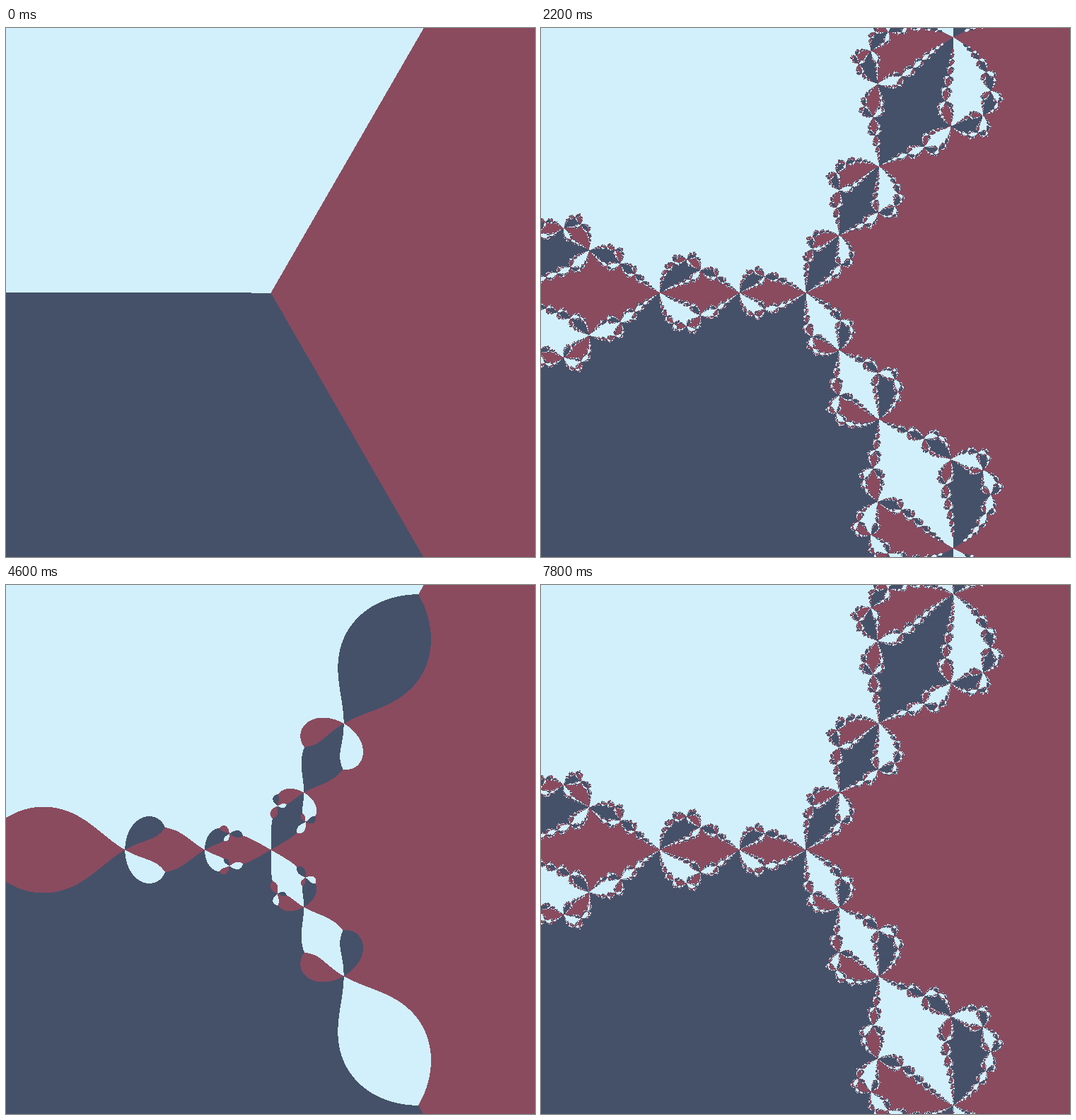
An HTML page with a canvas for the animation above (8 s loop, 748 by 748 pixels).

```html
<!DOCTYPE html>
<html lang="en">
<head>
<meta charset="utf-8">
<title>Cube root basins</title>
<style>
  html, body { margin: 0; width: 100%; height: 100%; overflow: hidden; }
  canvas { display: block; width: 748px; height: 748px; }
</style>
</head>
<body>
<canvas width="748" height="748"></canvas>
<script>
const SIZE = 748, CENTER = SIZE / 2, UNIT = SIZE / 8;
const STEP_MS = 200, STEPS = 20;

const rgb = (r, g, b) => (255 << 24 | b << 16 | g << 8 | r) >>> 0;
const RED = rgb(138, 75, 95), LIGHT = rgb(210, 240, 251), DARK = rgb(69, 81, 105);

const ctx = document.querySelector("canvas").getContext("2d");
const re = new Float64Array(SIZE * SIZE);
const im = new Float64Array(SIZE * SIZE);
const frames = [];

for (let i = 0; i < re.length; i++) {
  re[i] = (i % SIZE - CENTER) / UNIT;
  im[i] = (CENTER - Math.floor(i / SIZE)) / UNIT;
}

// Colour of the cube root of 1 nearest to x + iy.
function basin(x, y) {
  if (Math.sqrt(3) * x > Math.abs(y)) return RED;
  return y > 0 || (y === 0 && x > -0.29) ? LIGHT : DARK;
}

// Averaging iteration: z becomes (z + 1/z²) / 2.
function iterate() {
  for (let i = 0; i < re.length; i++) {
    const x = re[i], y = im[i], norm = x * x + y * y, d = norm * norm;
    re[i] = (x + (x * x - y * y) / d) / 2;
    im[i] = (y - 2 * x * y / d) / 2;
  }
}

function addFrame() {
  if (frames.length) iterate();
  const image = ctx.createImageData(SIZE, SIZE);
  const pixels = new Uint32Array(image.data.buffer);
  for (let i = 0; i < pixels.length; i++) pixels[i] = basin(re[i], im[i]);
  frames.push(image);
}

while (frames.length < STEPS) addFrame();

let start, shown = -1;
function draw(now) {
  start ??= now;
  const step = Math.floor(Math.max(0, now - start) / STEP_MS) % STEPS;
  if (step !== shown) ctx.putImageData(frames[shown = step], 0, 0);
  requestAnimationFrame(draw);
}
requestAnimationFrame(draw);
</script>
</body>
</html>
```
